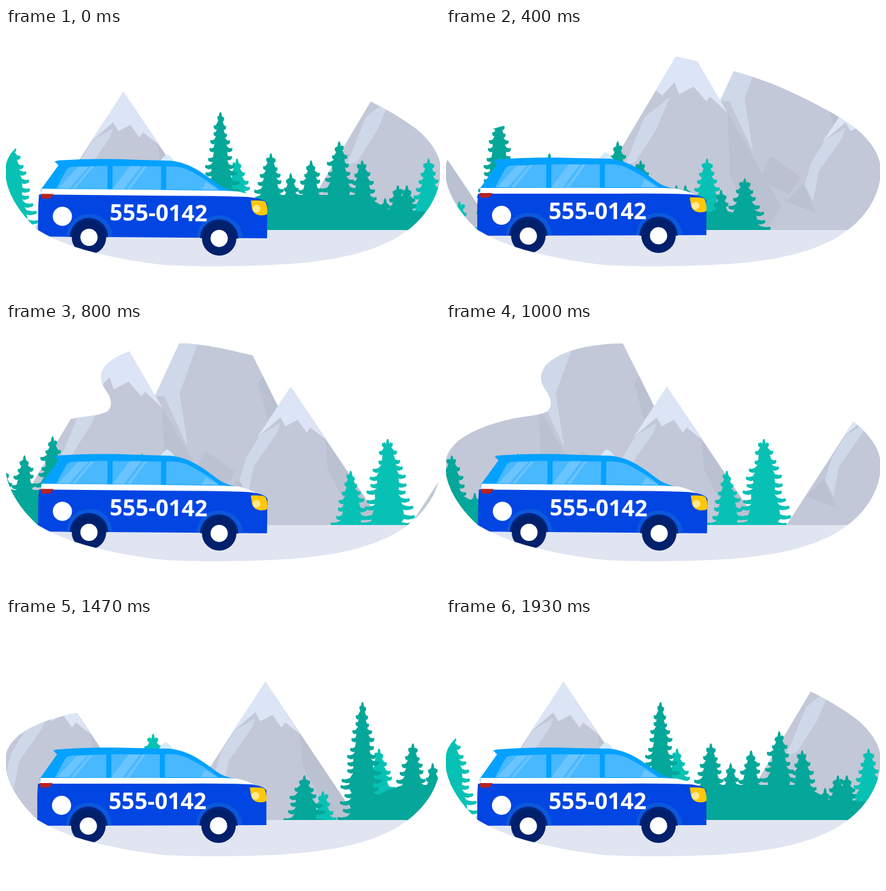
An HTML page for the animation above (1.99 s loop, 680x419 px).

```html
<!DOCTYPE html>
<html lang="en">
<head>
<meta charset="utf-8">
<title>Road trip</title>
<style>
  html, body { margin: 0; width: 100%; height: 100%; overflow: hidden; background: #fff; }
  svg { display: block; width: 100vw; height: 100vh; }
  text { font: 700 35.5px "Open Sans", "Noto Sans", sans-serif; }
</style>
</head>
<body>
<svg viewBox="0 0 680 419">
  <defs>
    <clipPath id="blob">
      <path d="M277 32C310 33 350 42 365 46C415 57 470 72 510 87C560 108 610 133 645 160C670 182 683 205 681 228C679 265 655 300 625 320C590 347 530 362 470 368C400 375 300 375 250 372C200 367 160 358 130 350C90 339 65 326 50 317C20 290-2 255-1 222C0 205 8 195 20 184C45 166 75 157 100 151C125 146 145 146 158 139C168 132 165 118 158 108C150 97 146 85 151 75C156 64 165 58 180 50C205 38 240 32 277 32Z"/>
    </clipPath>
    <g id="land"></g>
  </defs>
  <g clip-path="url(#blob)">
    <g id="scenery"></g>
    <path fill="#e0e5f1" d="M0 317H680V380H0Z"/>
    <g id="car">
      <path fill="#d5eafa" d="M239 206Q246 196 250 195Q256 197 262 206Z"/>
      <path fill="#04a1ff" d="M53 252L80 214L74 208Q78 206 85 206Q140 202 200 204L256 205C284 208 302 220 330 241Q340 249 362 253L340 262H53Z"/>
      <g fill="#48b8ff">
        <path d="M77 250L92 222Q95 217 101 216L157 214V251Z"/>
        <path d="M165 214H241V251H165Z"/>
        <path d="M249 214Q270 213 283 219Q308 231 333 250H249Z"/>
      </g>
      <g fill="#6ac4ff">
        <path d="M80 250L111 216H127L97 250ZM102 250L131 215H136L107 250Z"/>
        <path d="M165 250L192 214H210L183 250ZM188 250L214 214H219L193 250Z"/>
        <path d="M311 238L331 250H305Z"/>
      </g>
      <path fill="#fff" d="M54 251H338L362 252Q380 256 390 262L385 270H52Z"/>
      <path fill="#0145e3" d="M50 260L250 260Q350 259 382 261Q404 263 408 271V325L49 326V278Z"/>
      <path fill="#0b58dc" d="M94 326C96 300 112 290 130 290S164 301 166 325ZM298 325C300 300 316 290 333 290S368 301 371 325Z"/>
      <path fill="#052581" d="M99 326A30 30 0 0 1 159 326ZM303 326A30 30 0 0 1 363 326Z"/>
      <path fill="#b9221f" d="M53 259H73L69 265Q67 267 54 266Z"/>
      <path fill="#ffc709" d="M382 266Q400 265 405 268Q409 277 408 287Q404 290 395 289Q386 287 384 279Z"/>
      <circle cx="391" cy="279" r="6" fill="#ffea91"/>
      <circle cx="87" cy="294" r="15" fill="#fff"/>
      <text x="237.5" y="299.5" text-anchor="middle" fill="#fff">555-0142</text>
      <g fill="#00206c"><circle cx="129" cy="326.5" r="27"/><circle cx="333" cy="326" r="27"/></g>
      <g fill="#fff"><circle cx="129" cy="326.5" r="13.5"/><circle cx="333" cy="326" r="13.5"/></g>
    </g>
  </g>
</svg>
<script>
const LOOP = 1990, SPAN = 1039, GROUND = 318;
const ROCK = '#c2c8d7', SHADE = '#bac1d0', SHINE = '#cfd8e8', SNOW = '#dce5f5';
const DARK = '#04a799', LIGHT = '#07c1b5';
const byId = id => document.getElementById(id);

let seed = 7;
const random = () => (seed = seed * 16807 % 2147483647) / 2147483647;

const shape = (color, d) => `<path fill="${color}" d="${d}"/>`;
const at = (x, y, parts) => `<g transform="translate(${x} ${y})">${parts}</g>`;

const snowPeak = x => at(x, 100,
  shape(ROCK, 'M0 0L146 218H-141Z') +
  shape(SHADE, 'M54 82L146 218H104L58 130ZM-110 172L-82 145L-62 190Z') +
  shape(SHINE, 'M-48 76L-16 57L-21 72L-58 125L-67 172L-80 146L-70 112Z') +
  shape(SNOW, 'M0 0L-52 79L-16 48L-8 62L11 52L25 72L31 64L54 82Z'));

const tallPeak = x => at(x, 20,
  shape(ROCK, 'M0 0L172 298H-177Z') +
  shape(SHADE, 'M66 113L172 298H110L70 210Z') +
  shape(SHINE, 'M-64 120L-24 88L-46 140L-78 190L-95 196Z') +
  shape(SNOW, 'M0 0L-46 78L-36 86L-17 65L-10 84L13 72L33 95L39 88L66 113Z'));

const tableRock = x => at(x, 20,
  shape(ROCK, 'M0 0H94L243 298H-137Z') +
  shape(SHADE, 'M125 62L150 115L133 131L118 75ZM35 180L88 218L63 240L18 220Z') +
  shape(SHINE, 'M0 0H28L-5 90L8 175L-29 95L-44 95Z'));

// One side of a fir: blunt boughs that widen towards the ground.
function boughs(top, width, side) {
  const height = GROUND - top, tiers = Math.round(height / 12.5), step = height / tiers;
  let d = `M${-side} ${top}Q${side * 2} ${top - 1} ${side * 2.5} ${top + step * .6}`;
  for (let i = 1; i <= tiers; i++) {
    const y = top + step * (i - .15) + (random() - .5) * 4;
    const tip = side * width * Math.pow(i / tiers, .7) * (.8 + .32 * random());
    const inner = tip * .62;
    d += `L${inner} ${y - 4}Q${tip * .85} ${y - 1} ${tip} ${y - 3}` +
      `Q${tip * 1.1} ${y + 2} ${tip * .9} ${y + 3}Q${tip * .75} ${y + 5} ${inner} ${y + 3}`;
  }
  return d + `L${side * width * .8} ${GROUND}H${-side}Z`;
}
const fir = (x, top, width, color) =>
  at(x, 0, shape(color, boughs(top, width, 1)) + shape(color, boughs(top, width, -1)));
const firs = (color, list) => list.map(([x, top, width]) => fir(x, top, width, color)).join('');

byId('land').innerHTML =
  tableRock(726) + tallPeak(628) + snowPeak(895) + snowPeak(184) +
  firs(LIGHT, [[274, 272, 20], [362, 205, 36], [662, 205, 37], [989, 232, 28], [1047, 182, 43]]) +
  shape(DARK, 'M336 318V290L376 270L400 262H560L600 285L690 290L757 318Z') +
  firs(DARK, [[245, 247, 33], [336, 132, 38], [415, 197, 38], [446, 228, 28], [478, 208, 35],
    [522, 178, 42], [558, 208, 36], [594, 267, 20], [614, 247, 26], [628, 247, 26],
    [684, 254, 24], [721, 236, 37]]);
byId('scenery').innerHTML =
  [0, 1, 2].map(i => `<use href="#land" x="${(i - 1) * SPAN}"/>`).join('');

// Distance travelled at a given step, straight between the keys.
const keys = [[0, 0], [3, 157], [9, 349], [15, 549], [19, 707], [25, 926], [29, SPAN]];
function distance(step) {
  const i = Math.max(1, keys.findIndex(([k]) => k >= step));
  const [a, from] = keys[i - 1], [b, to] = keys[i];
  return from + (to - from) * (step - a) / (b - a);
}

function draw(ms) {
  const step = Math.floor((ms % LOOP + 3) / 66.5);
  byId('scenery').setAttribute('transform', `translate(${-distance(step)} 0)`);
  const phase = step * 8 / 30 % 1;
  const low = phase < .3 || phase > .9;
  byId('car').setAttribute('transform', low ? 'translate(1 2) rotate(.6 129 327)' : '');
}

let start;
function tick(now) {
  start ??= now;
  draw(now - start);
  requestAnimationFrame(tick);
}
draw(0);
requestAnimationFrame(tick);
</script>
</body>
</html>
```
